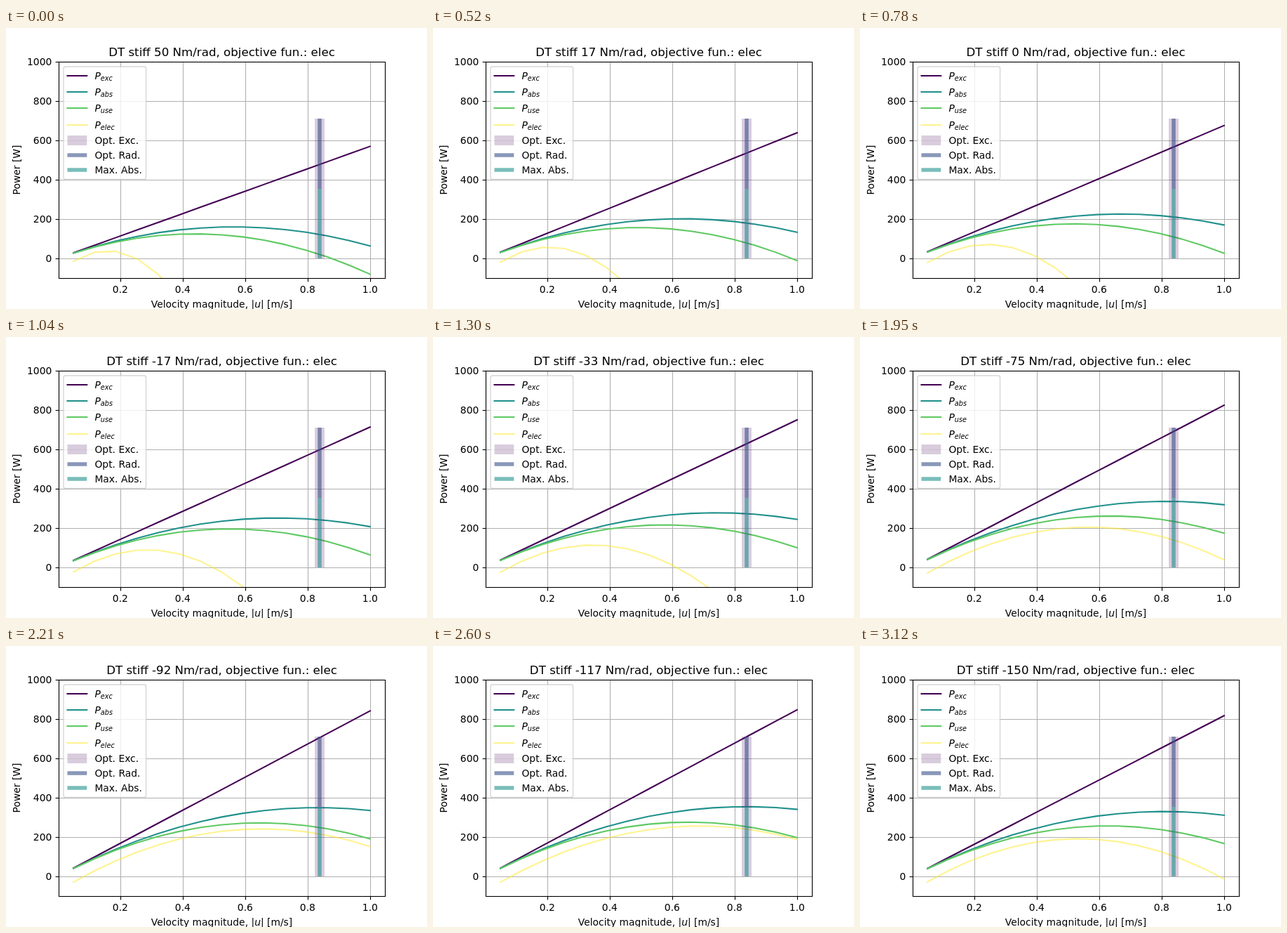
Animation of 600 by 400 pixels, one loop 3.25 s. Source, as an HTML page with a canvas:

```html
<!DOCTYPE html>
<html lang="en">
<head>
<meta charset="utf-8">
<title>Power over velocity magnitude</title>
<style>
  html, body { margin: 0; width: 100%; height: 100%; overflow: hidden; background: #fff; }
  canvas { display: block; }
</style>
</head>
<body>
<canvas id="stage" width="600" height="400"></canvas>
<script>
const ctx = document.getElementById('stage').getContext('2d');

const STEPS = 25, STEP_MS = 130, POINTS = 15;
const EM = 1000 / 72;          // 10 pt at 100 dpi
const PT = 100 / 72;
const BOX = { left: 75, top: 48, right: 540, bottom: 356 };
const FORCE = 848, RADIATION = 506, DAMPING = 650, COPPER = 1.05e-4;

const PURPLE = '#440154', BLUE = '#3b528b', TEAL = '#21918c', GREEN = '#5ec962', YELLOW = '#fde725';
const CURVES = [
  { sub: 'exc', color: PURPLE, alpha: 1, legendY: 68.5 },
  { sub: 'abs', color: TEAL, alpha: 1, legendY: 91.5 },
  { sub: 'use', color: GREEN, alpha: 1, legendY: 114.5 },
  { sub: 'elec', color: YELLOW, alpha: 0.5, legendY: 138 }
];
const bestSpeed = FORCE / (2 * RADIATION);
const bestPower = FORCE * bestSpeed;
const BARS = [
  { label: 'Opt. Exc.', color: PURPLE, alpha: 0.2, width: 10 * PT, from: 0, to: bestPower, legendY: 160 },
  { label: 'Opt. Rad.', color: BLUE, alpha: 0.6, width: 4 * PT, from: bestPower / 2, to: bestPower, legendY: 181 },
  { label: 'Max. Abs.', color: TEAL, alpha: 0.6, width: 4 * PT, from: 0, to: bestPower / 2, legendY: 202 }
];

const px = u => BOX.left + (u - 0.0025) * 445;
const py = watts => 328 - watts * 0.28;
const snap = v => Math.floor(v + 0.5) + 0.5;

function stroke(points, color, width, alpha = 1, cap = 'butt') {
  ctx.globalAlpha = alpha;
  ctx.strokeStyle = color;
  ctx.lineWidth = width;
  ctx.lineCap = cap;
  ctx.lineJoin = 'round';
  ctx.beginPath();
  points.forEach(([x, y]) => ctx.lineTo(x, y));
  ctx.stroke();
  ctx.globalAlpha = 1;
}

function setFont(size, style = 'normal') {
  ctx.font = `${style} ${size}px "DejaVu Sans", sans-serif`;
}

function text(string, x, y, align = 'left', size = EM, style = 'normal') {
  setFont(size, style);
  ctx.fillStyle = '#000';
  ctx.textAlign = align;
  ctx.fillText(string, x, y);
  return ctx.measureText(string).width;
}

// Electrical power subtracts the losses from active and reactive force.
function powers(u, stiffness) {
  const phase = Math.atan((stiffness + 109.8) * 0.0069);
  const active = FORCE * Math.cos(phase);
  const reactance = 5500 * Math.tan(phase);
  const exc = active * u;
  const use = exc - DAMPING * u * u;
  const loss = COPPER * ((active - DAMPING * u) ** 2 + (FORCE * Math.sin(phase) - reactance * u) ** 2);
  return [exc, exc - RADIATION * u * u, use, use - loss];
}

function drawGrid() {
  const line = 0.8 * PT;
  for (let i = 1; i <= 5; i++) {
    const x = snap(px(i / 5));
    stroke([[x, BOX.top], [x, BOX.bottom]], '#b0b0b0', line);
    stroke([[x, BOX.bottom + 0.5], [x, BOX.bottom + 5.4]], '#000', line);
    text((i / 5).toFixed(1), px(i / 5), 377, 'center');
  }
  for (let watts = 0; watts <= 1000; watts += 200) {
    const y = snap(py(watts));
    stroke([[BOX.left, y], [BOX.right, y]], '#b0b0b0', line);
    stroke([[BOX.left + 0.5, y], [BOX.left - 4.4, y]], '#000', line);
    text(String(watts), 65.3, Math.round(py(watts)) + 5, 'right');
  }
}

function drawCurves(stiffness) {
  ctx.save();
  ctx.beginPath();
  ctx.rect(BOX.left, BOX.top, BOX.right - BOX.left, BOX.bottom - BOX.top);
  ctx.clip();
  const samples = Array.from({ length: POINTS }, (_, i) => {
    const u = 0.05 + 0.95 * i / (POINTS - 1);
    return { x: px(u), values: powers(u, stiffness) };
  });
  CURVES.forEach((curve, k) => {
    const points = samples.map(s => [s.x, py(s.values[k])]);
    stroke(points, curve.color, 1.5 * PT, curve.alpha, 'square');
  });
  const x = Math.round(px(bestSpeed));
  for (const bar of BARS) {
    const ends = [bar.from, bar.to].map(w => [x, Math.round(py(w))]);
    stroke(ends, bar.color, bar.width, bar.alpha);
  }
  ctx.restore();
}

function drawFrame() {
  ctx.strokeStyle = '#000';
  ctx.lineWidth = 0.8 * PT;
  ctx.lineJoin = 'miter';
  ctx.strokeRect(BOX.left + 0.5, BOX.top + 0.5, BOX.right - BOX.left, BOX.bottom - BOX.top);
}

function drawLegend() {
  ctx.globalAlpha = 0.8;
  ctx.beginPath();
  ctx.roundRect(82, 55, 117.6, 160.5, 2.8);
  ctx.fillStyle = '#fff';
  ctx.fill();
  ctx.strokeStyle = '#ccc';
  ctx.lineWidth = PT;
  ctx.stroke();
  ctx.globalAlpha = 1;

  const left = 87.5, right = 115.3, label = 126.4;
  for (const { sub, color, alpha, legendY } of CURVES) {
    const y = Math.floor(legendY);
    stroke([[left, y], [right, y]], color, 1.5 * PT, alpha, 'square');
    const advance = text('P', label, y + 5, 'left', EM, 'italic');
    text(sub, label + advance, y + 7, 'left', 0.7 * EM, 'italic');
  }
  for (const bar of BARS) {
    stroke([[left, bar.legendY], [right, bar.legendY]], bar.color, bar.width, bar.alpha);
    text(bar.label, label, bar.legendY + 5);
  }
}

function drawAxisLabels() {
  const runs = [['Velocity magnitude, |', 'normal'], ['u', 'italic'], ['| [m/s]', 'normal']];
  const total = runs.reduce((sum, [string, style]) => {
    setFont(EM, style);
    return sum + ctx.measureText(string).width;
  }, 0);
  let x = 307.5 - total / 2;
  for (const [string, style] of runs) x += text(string, x, 398, 'left', EM, style);

  ctx.save();
  ctx.translate(20, 202);
  ctx.rotate(-Math.PI / 2);
  text('Power [W]', 0, 0, 'center');
  ctx.restore();
}

function draw(now) {
  const step = Math.floor(now / STEP_MS) % STEPS;
  const stiffness = 50 - 200 * step / (STEPS - 1);
  ctx.fillStyle = '#fff';
  ctx.fillRect(0, 0, 600, 400);
  drawGrid();
  drawCurves(stiffness);
  drawFrame();
  drawLegend();
  drawAxisLabels();
  text(`DT stiff ${Math.round(stiffness)} Nm/rad, objective fun.: elec`, 307.5, 40, 'center', 1.2 * EM);
}

function loop() {
  draw(performance.now());
  requestAnimationFrame(loop);
}
loop();
</script>
</body>
</html>
```
